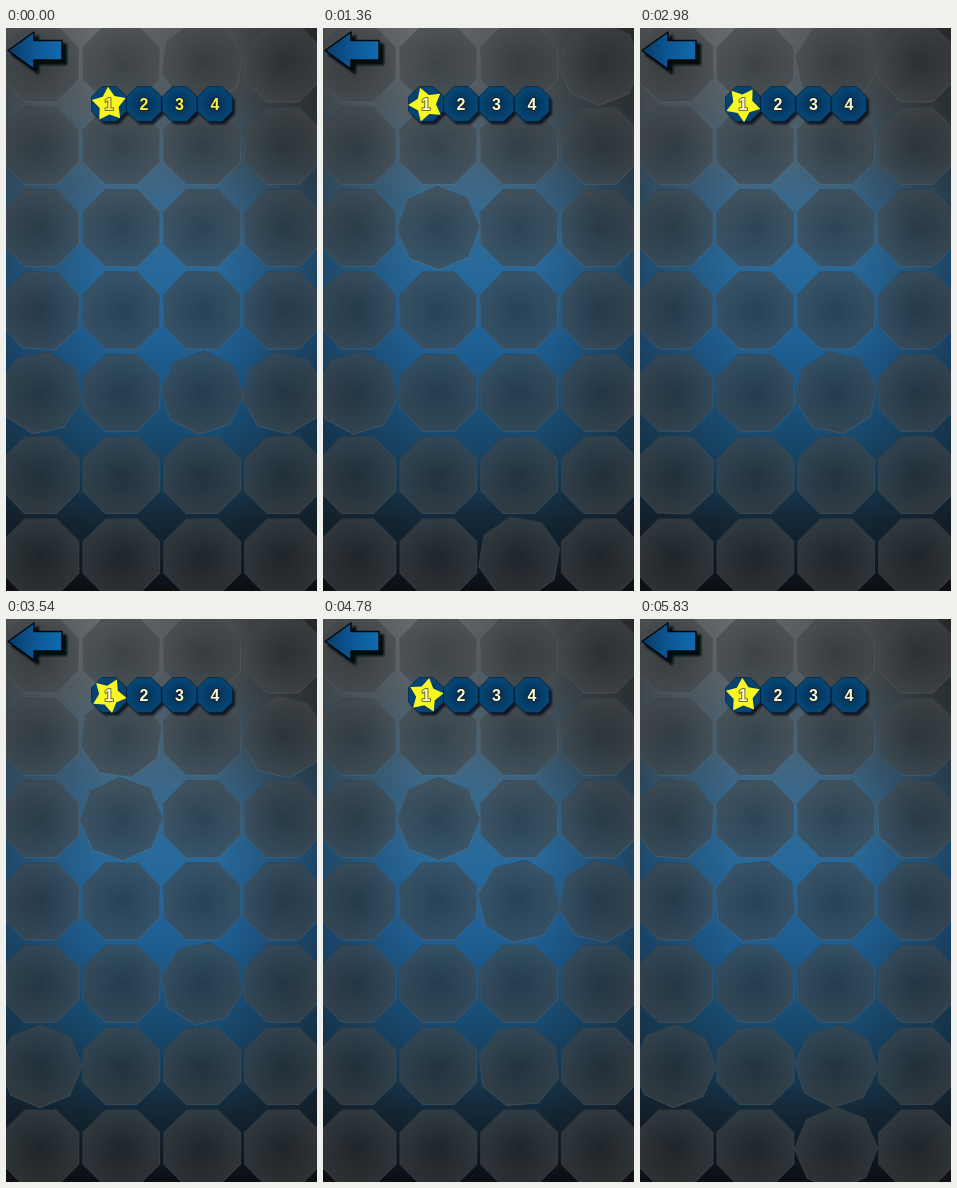
Write an HTML page that moves like this. It is 311x563 px and loops after 5870 ms.

```html
<!DOCTYPE html>
<html lang="en">
<head>
<meta charset="utf-8">
<title>Level select</title>
<style>
  html, body { margin: 0; width: 100%; height: 100%; overflow: hidden; background: #0a0c10; }
  svg { display: block; width: 311px; height: 563px; }
  text {
    font: bold 16px "Liberation Sans", Arial, sans-serif;
    text-anchor: middle;
    paint-order: stroke;
    stroke: rgba(20, 26, 32, .6);
    stroke-width: 2px;
    stroke-linejoin: round;
  }
</style>
</head>
<body>
<svg viewBox="0 0 311 563">
  <defs>
    <linearGradient id="sky" x1="0" y1="0" x2="0" y2="1">
      <stop offset="0" stop-color="#696d6f"/>
      <stop offset=".13" stop-color="#58656d"/>
      <stop offset=".28" stop-color="#3e6785"/>
      <stop offset=".41" stop-color="#296a9b"/>
      <stop offset=".54" stop-color="#206298"/>
      <stop offset=".71" stop-color="#194c72"/>
      <stop offset=".8" stop-color="#163c58"/>
      <stop offset=".87" stop-color="#142939"/>
      <stop offset="1" stop-color="#0b0f14"/>
    </linearGradient>
    <radialGradient id="corner" gradientUnits="userSpaceOnUse" cx="311" cy="0" r="220">
      <stop offset="0" stop-color="#000" stop-opacity=".45"/>
      <stop offset="1" stop-color="#000" stop-opacity="0"/>
    </radialGradient>
    <linearGradient id="sides">
      <stop offset="0" stop-color="#111" stop-opacity=".36"/>
      <stop offset=".32" stop-color="#111" stop-opacity="0"/>
      <stop offset=".68" stop-color="#111" stop-opacity="0"/>
      <stop offset="1" stop-color="#111" stop-opacity=".4"/>
    </linearGradient>
    <radialGradient id="tile">
      <stop offset="0" stop-color="#292e31"/>
      <stop offset=".5" stop-color="#353a3c"/>
      <stop offset="1" stop-color="#424648"/>
    </radialGradient>
    <linearGradient id="rim" x1="0" y1="0" x2=".4" y2="1">
      <stop offset="0" stop-color="#1a2228" stop-opacity=".45"/>
      <stop offset=".5" stop-color="#56646c" stop-opacity=".2"/>
      <stop offset="1" stop-color="#7b868c" stop-opacity=".25"/>
    </linearGradient>
    <radialGradient id="button">
      <stop offset="0" stop-color="#032f54"/>
      <stop offset="1" stop-color="#064776"/>
    </radialGradient>
    <linearGradient id="arrow">
      <stop offset="0" stop-color="#083a66"/>
      <stop offset=".5" stop-color="#0d5795"/>
      <stop offset="1" stop-color="#106bb0"/>
    </linearGradient>
    <filter id="soft" x="-20%" y="-20%" width="140%" height="140%">
      <feGaussianBlur stdDeviation=".8"/>
    </filter>
    <path id="back" d="M2 22.5 28 4V12.5H56V32H28V41Z" stroke-linejoin="round"/>
  </defs>
  <rect width="311" height="563" fill="url(#sky)"/>
  <rect width="311" height="563" fill="url(#sides)"/>
  <rect width="311" height="563" fill="url(#corner)"/>
  <g id="tiles" fill="url(#tile)" fill-opacity=".62" stroke="url(#rim)"></g>
  <use href="#back" x="4" y="4" fill="#050709" stroke="#050709" stroke-width="2" filter="url(#soft)"/>
  <use href="#back" fill="url(#arrow)" stroke="#04080c" stroke-width="1.5"/>
  <g id="shadows" fill="#05080b" fill-opacity=".75" filter="url(#soft)"></g>
  <g id="buttons" fill="url(#button)" stroke="#03243f" stroke-width=".8"></g>
  <polygon id="star" fill="#f9f721"/>
  <g id="digits"></g>
</svg>
<script>
const LOOP = 5870, STEP = 47.3, TURN = 1100;

// Each turn: column, row, start time in ms
const turns = [
  [2, 0, -240], [0, 4, -800], [2, 4, -640], [3, 4, -350], [0, 3, -70],
  [2, 3, 60], [3, 2, 230], [0, 4, 630], [3, 0, 750], [1, 2, 820], [2, 6, 1090],
  [0, 5, 1380], [2, 4, 1680], [2, 5, 1850], [0, 0, 1920], [2, 0, 2170],
  [2, 4, 2690], [0, 5, 2930], [1, 2, 3000], [3, 1, 3170], [1, 1, 3300],
  [2, 5, 3800], [2, 3, 4000], [1, 2, 4240], [3, 3, 4460],
  [3, 2, 4750], [1, 3, 4850], [2, 5, 5150], [0, 5, 5220], [2, 6, 5290], [0, 2, 5710]
];

const byId = id => document.getElementById(id);

function add(parent, name, attrs, text = "") {
  const el = document.createElementNS("http://www.w3.org/2000/svg", name);
  for (const key in attrs) el.setAttribute(key, attrs[key]);
  el.textContent = text;
  byId(parent).append(el);
  return el;
}

// Points around a centre, cycling through the given radii
function ring(count, radii, offset) {
  return Array.from({ length: count }, (_, i) => {
    const a = (i * 360 / count + offset) * Math.PI / 180, r = radii[i % radii.length];
    return (r * Math.sin(a)).toFixed(2) + "," + (-r * Math.cos(a)).toFixed(2);
  }).join(" ");
}

const at = (x, y, angle = 0) => `translate(${x} ${y}) rotate(${angle})`;

const tiles = [];
for (let row = 0; row < 7; row++) {
  for (let col = 0; col < 4; col++) {
    const x = 34.5 + col * 80.8, y = 35.5 + row * 82.3;
    const el = add("tiles", "polygon", { points: ring(8, [41.7], 22.5) });
    const starts = turns.filter(t => t[0] === col && t[1] === row).map(t => t[2]);
    tiles.push({ el, x, y, starts });
  }
}

[103, 138, 173.5, 209].forEach((x, i) => {
  const points = ring(8, [18.8], 22.5);
  add("shadows", "polygon", { points, transform: at(x + 2.5, 79) });
  add("buttons", "polygon", { points, transform: at(x, 76) });
  add("digits", "text", { x, y: 81.5 }, i + 1);
});

const star = byId("star"), digits = byId("digits");
star.setAttribute("points", ring(10, [17.8, 10], 0));

function draw(now) {
  const t = Math.floor(now % LOOP / STEP) * STEP;
  for (const { el, x, y, starts } of tiles) {
    const start = starts.find(s => t >= s && t < s + TURN);
    const angle = start === undefined ? 0 : (t - start) / TURN * 45;
    el.setAttribute("transform", at(x, y, angle));
  }
  // One star point per loop, counter-clockwise
  star.setAttribute("transform", at(103, 76.5, -3 - 72 * t / LOOP));
  digits.setAttribute("fill", t < 30 ? "#fbf04a" : "#fdf8cf");
}

const begin = performance.now();
function tick() {
  draw(performance.now() - begin);
  requestAnimationFrame(tick);
}
tick();
</script>
</body>
</html>
```
